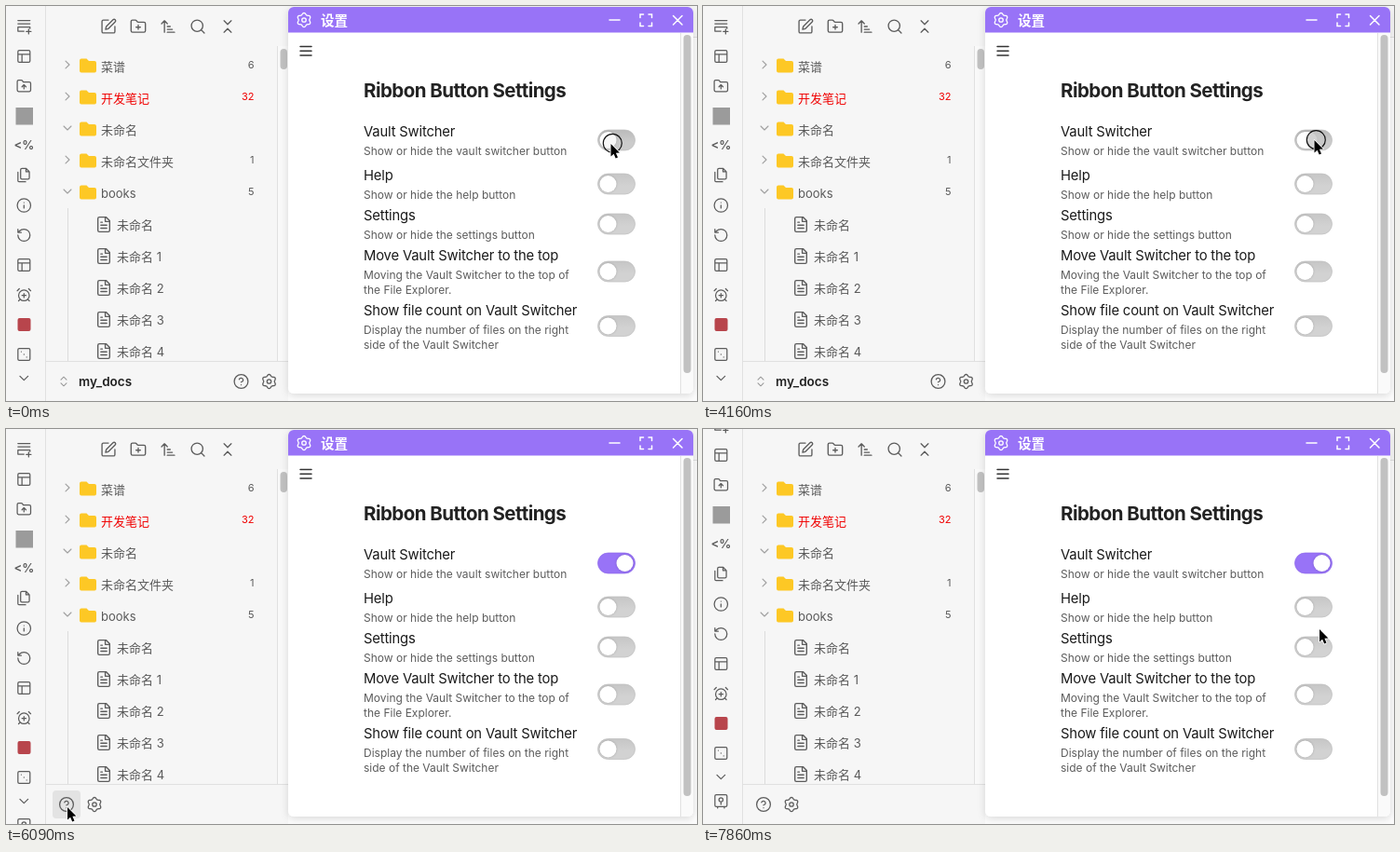
An HTML page for the animation above (8 s loop, 742 by 424 pixels).

```html
<!DOCTYPE html>
<html lang="en">
<head>
<meta charset="utf-8">
<title>Settings demo</title>
<style>
  html, body { margin: 0; width: 100%; height: 100%; overflow: hidden; background: #f6f6f6; }
  svg { display: block; }
  text { font-family: Inter, "Noto Sans CJK SC", "Noto Sans CJK", sans-serif; fill: #5a5a5a; font-size: 13px; }
  .icon { fill: none; stroke: #5c5c5c; stroke-width: 1.75; stroke-linecap: round; stroke-linejoin: round; }
  .count { font-size: 11px; text-anchor: end; }
  .red { fill: #f00000; }
  .name { font-size: 14.8px; letter-spacing: -.17px; fill: #1a1a1a; }
  .desc { font-size: 12px; fill: #5c5c5c; }
  .heading { font-size: 20.5px; font-weight: 700; letter-spacing: -.027em; fill: #222; }
  .line { stroke: #e0e0e0; }
  .knob { fill: #fff; filter: drop-shadow(0 .5px .8px rgba(0, 0, 0, .2)); }
</style>
</head>
<body>
<svg width="742" height="424" viewBox="0 0 742 424">
  <defs>
    <clipPath id="treeClip"><rect x="43" y="43" width="260" height="338"/></clipPath>
    <filter id="shadow" x="-10%" y="-10%" width="120%" height="120%">
      <feDropShadow dx="0" dy="2" stdDeviation="4" flood-opacity=".14"/>
    </filter>
    <linearGradient id="off" x2="0" y2="1">
      <stop stop-color="#c6c6c6"/><stop offset=".6" stop-color="#d2d2d2"/>
    </linearGradient>
    <linearGradient id="over" x2="0" y2="1">
      <stop stop-color="#bababa"/><stop offset=".6" stop-color="#cbcbcb"/>
    </linearGradient>
  </defs>

  <rect width="742" height="424" fill="#f6f6f6"/>
  <rect x="303" y="33" width="439" height="391" fill="#fcfcfc"/>
  <path class="line" d="M303 33.5H742M42.5 0V424"/>

  <rect id="hover" rx="4" fill="#e3e3e3"/>
  <g id="ribbon"></g>
  <g id="toolbar"></g>
  <g id="tree" clip-path="url(#treeClip)">
    <path d="M66.5 217V381" stroke="#dcdcdc"/>
  </g>
  <rect x="291" y="43" width="12" height="338" fill="#f9f9f9"/>
  <path class="line" d="M291.5 43V381M43 381.5H303"/>
  <rect x="294.5" y="46" width="7.5" height="22" rx="3.75" fill="#c1c1c1"/>
  <g id="switcher">
    <text x="78" y="407.5" style="font-weight:600;font-size:13.5px;fill:#222">my_docs</text>
  </g>
  <g id="footer"></g>

  <g id="modal">
    <rect x="303" y="1" width="435" height="415" rx="6" fill="#fff" filter="url(#shadow)"/>
    <path d="M303 28.5V7a6 6 0 0 1 6-6H732a6 6 0 0 1 6 6V28.5z" fill="#9873f7"/>
    <text x="338" y="20.5" style="font-size:14.5px;font-weight:700;fill:#fff">设置</text>
    <g fill="none" stroke="#fff" stroke-width="1.5" stroke-linecap="round">
      <path d="M648 15H659M716.5 10.5l9.5 9.5M726 10.5l-9.5 9.5"/>
      <path d="M681 12.5V9h3.5M690 9h3.5v3.5M693.5 18v3.5H690M684.5 21.5H681V18"/>
    </g>
    <path d="M316 43.5h12M316 48.3h12M316 53h12" stroke="#333" stroke-width="1.5" stroke-linecap="round"/>
    <path d="M724.5 29H738V410a6 6 0 0 1-6 6H724.5z" fill="#fafafa"/>
    <path class="line" d="M724.5 29V416"/>
    <rect x="727.5" y="31" width="8" height="363" rx="4" fill="#c1c1c1"/>
    <text class="heading" x="384" y="98">Ribbon Button Settings</text>
  </g>

  <circle id="ring" r="10" fill="#c8c8c8" stroke="#111" stroke-width="1.2"/>
  <path id="cursor" d="M0 0V13.5L3.1 10.7 5.2 15.6 7.5 14.6 5.4 9.8 9.4 9.5z"
        fill="#000" stroke="#fff" stroke-width="1.6" paint-order="stroke" stroke-linejoin="round"/>
</svg>

<script>
const LOOP = 8000;
const $ = id => document.getElementById(id);

function set(el, attrs) {
  for (const key in attrs) el.setAttribute(key, attrs[key]);
}

function add(parent, tag, attrs, content) {
  const el = document.createElementNS('http://www.w3.org/2000/svg', tag);
  set(el, attrs);
  if (content) el.textContent = content;
  return parent.appendChild(el);
}

// Icons are drawn on a 24-unit grid and centred on x, y.
const icon = (parent, x, y, d, scale = .72, attrs = {}) =>
  add(parent, 'path', { class: 'icon', d, transform: `translate(${x} ${y}) scale(${scale}) translate(-12 -12)`, ...attrs });

const circle = (x, y, r) => `M${x + r} ${y}a${r} ${r} 0 1 1 ${-2 * r} 0 ${r} ${r} 0 0 1 ${2 * r} 0z`;
const lobes = Array.from({ length: 72 }, (_, i) => {
  const a = i * Math.PI / 36, r = 9 - 1.2 * Math.cos(6 * a);
  return (12 + r * Math.cos(a)).toFixed(2) + ' ' + (12 + r * Math.sin(a)).toFixed(2);
}).join('L');
const box = 'M5 3h14a2 2 0 0 1 2 2v14a2 2 0 0 1-2 2H5a2 2 0 0 1-2-2V5a2 2 0 0 1 2-2z';
const folder = 'M4 20h16a2 2 0 0 0 2-2V8a2 2 0 0 0-2-2h-7.9a2 2 0 0 1-1.7-.9l-.8-1.2A2 2 0 0 0 7.9 3H4a2 2 0 0 0-2 2v13a2 2 0 0 0 2 2z';
const ICON = {
  rows: 'M3 3h18M3 8h18M3 13h18v2M3 13v6h9M19 16v7M15.5 19.5h7',
  layout: box + 'M3 9h18M9 21V9',
  folderUp: folder + 'M12 10v6M9 13l3-3 3 3',
  folderPlus: folder + 'M12 10v6M9 13h6',
  files: 'M15 2H9a2 2 0 0 0-2 2v12a2 2 0 0 0 2 2h9a2 2 0 0 0 2-2V7zM15 2v5h5M3 7.6v12.8A1.6 1.6 0 0 0 4.6 22h9.8',
  info: circle(12, 12, 10) + 'M12 16v-4M12 8h.01',
  undo: 'M3 12a9 9 0 1 0 9-9 9.75 9.75 0 0 0-6.74 2.74L3 8M3 3v5h5',
  alarm: circle(12, 13, 8) + 'M5 3 2 6M22 6l-3-3M6.4 18.7 4 21M17.6 18.7 20 21M12 10v6M9 13h6',
  dice: box + 'M8 8h.01M12 12h.01M16 16h.01',
  down: 'M6 9l6 6 6-6',
  right: 'M9 6l6 6-6 6',
  vault: box + circle(12, 10.5, 3) + 'M12 13.5v4M7 21v2M17 21v2',
  edit: 'M12 3H5a2 2 0 0 0-2 2v14a2 2 0 0 0 2 2h14a2 2 0 0 0 2-2v-7M18.4 2.6a2.1 2.1 0 0 1 3 3L12 15l-4 1 1-4z',
  sort: 'M3 8l4-4 4 4M7 4v16M11 12h4M11 16h7M11 20h10',
  search: circle(11, 11, 8) + 'M21 21l-4.3-4.3',
  collapse: 'M7 20l5-5 5 5M7 4l5 5 5-5',
  upDown: 'M7 15l5 5 5-5M7 9l5-5 5 5',
  help: circle(12, 12, 10) + 'M9.1 9a3 3 0 0 1 5.8 1c0 2-3 3-3 3M12 17h.01',
  gear: `M${lobes}z` + circle(12, 12, 3),
  page: 'M15 2H6a2 2 0 0 0-2 2v16a2 2 0 0 0 2 2h12a2 2 0 0 0 2-2V7zM14 2v6h6M16 13H8M16 17H8M10 9H8'
};

// Ribbon
const ribbon = $('ribbon');
[['rows', 22], ['layout', 54], ['folderUp', 86], ['files', 181.5], ['info', 214], ['undo', 246],
 ['layout', 278], ['alarm', 310], ['dice', 374], ['down', 399.5]]
  .forEach(([name, y]) => icon(ribbon, 19.3, y, ICON[name]));
add(ribbon, 'rect', { x: 10.5, y: 109, width: 18.5, height: 18.5, fill: '#9b9b9b' });
add(ribbon, 'text', { x: 19.3, y: 154, 'text-anchor': 'middle', style: 'font-size:13px;font-weight:600' }, '<%');
add(ribbon, 'rect', { x: 12.5, y: 335, width: 14, height: 14, rx: 2, fill: '#b8454c' });
const vaultIcon = icon(ribbon, 19.3, 425, ICON.vault);

['edit', 'folderPlus', 'sort', 'search', 'collapse']
  .forEach((name, i) => icon($('toolbar'), 110 + 32 * i, 22, ICON[name], .77));

// File tree
const tree = $('tree');
[['菜谱', 6], ['开发笔记', 32], ['未命名', '', true], ['未命名文件夹', 1], ['books', 5, true]].forEach(([label, count, open], i) => {
  const y = 65 + 34 * i, red = i === 1 ? ' red' : '';
  icon(tree, 66, y - 2, open ? ICON.down : ICON.right, .66, { style: 'stroke:#a0a0a0' });
  add(tree, 'path', { fill: '#fdc825', d: `M81 ${y - 8.5}h5.5l2.5 2.5h6a2 2 0 0 1 2 2v8.5a2 2 0 0 1-2 2H81a2 2 0 0 1-2-2v-11a2 2 0 0 1 2-2z` });
  add(tree, 'text', { x: 102, y: y + 5.2, class: red }, label);
  add(tree, 'text', { x: 266.5, y: y + 2.2, class: 'count' + red }, String(count));
});
const fileLabels = Array.from({ length: 5 }, (_, i) => {
  const y = 235 + 34 * i;
  icon(tree, 105, y - .5, ICON.page, .79);
  return add(tree, 'text', { x: 119, y: y + 5.2 }, '未命名' + (i ? ' ' + i : ''));
});

// Footer
icon($('switcher'), 62, 403, ICON.upDown, .6, { style: 'stroke:#999' });
const footer = $('footer');
icon(footer, 252.5, 403, ICON.help, .74);
icon(footer, 282.5, 403, ICON.gear, .74);

// Settings window
const modal = $('modal');
icon(modal, 320, 15, ICON.gear, .74, { style: 'stroke:#fff' });
const toggles = [
  [140, 144, 'Vault Switcher', 'Show or hide the vault switcher button'],
  [187, 191, 'Help', 'Show or hide the help button'],
  [230, 234, 'Settings', 'Show or hide the settings button'],
  [273, 285, 'Move Vault Switcher to the top', 'Moving the Vault Switcher to the top of', 'the File Explorer.'],
  [331.5, 343.5, 'Show file count on Vault Switcher', 'Display the number of files on the right', 'side of the Vault Switcher']
].map(([top, y, name, ...lines]) => {
  add(modal, 'text', { x: 384, y: top, class: 'name' }, name);
  lines.forEach((line, i) => add(modal, 'text', { x: 384, y: top + 20.3 + 15.7 * i, class: 'desc' }, line));
  const track = add(modal, 'rect', { x: 635.5, y: y - 11, width: 40, height: 22, rx: 11, 'stroke-width': .7 });
  const knob = add(modal, 'rect', { class: 'knob', y: y - 9, height: 18, rx: 9 });
  return { y, track, knob };
});

// Pointer positions: time, x, y
const pointer = [
  [0, 649.5, 148], [750, 649.5, 147], [1040, 649.5, 145], [1340, 649.5, 144.3], [1630, 649.3, 144],
  [1780, 658, 124], [1930, 677, 96], [2070, 691, 83], [2220, 694, 104], [2370, 689, 148],
  [2520, 678.5, 179], [2670, 669, 166], [2820, 651, 156], [2970, 643, 147], [3120, 656.5, 146],
  [3710, 656.5, 144], [5050, 650, 150], [5200, 600, 185], [5340, 500, 240], [5490, 350, 310],
  [5640, 205, 355], [5790, 119, 370], [5940, 85, 392], [6090, 66, 406], [6230, 40, 413],
  [6380, 34, 412], [6530, 30, 409], [6680, 27, 406], [6830, 25, 404], [6980, 24, 403],
  [7130, 22, 402], [7280, 110, 392], [7430, 330, 320], [7580, 560, 255], [7720, 677, 222], [7860, 662, 215]
];
// Hover areas: x, y, width, height
const areas = [[54, 353, 224, 28], [50, 388, 30, 30], [80, 388, 30, 30], [5, 384, 28, 30]];
const inside = (px, py, [x, y, w, h]) => px >= x && px < x + w && py >= y && py < y + h;

function render(t) {
  const [, x, y] = pointer.findLast(p => p[0] <= t);
  set($('cursor'), { transform: `translate(${x} ${y})` });

  const pressed = t >= 4160 && t < 4310;
  const [cx, cy] = pressed ? [658.3, 143.7] : [651.3, 147.3];
  set($('ring'), { cx, cy, 'fill-opacity': pressed ? .8 : .15, visibility: pressed || t < 150 ? 'visible' : 'hidden' });

  const on = t >= 4310;
  toggles.forEach((toggle, i) => {
    const active = on && i === 0;
    const over = inside(x, y, [635, toggle.y - 11, 41, 22]);
    set(toggle.track, {
      fill: active ? '#9873f7' : over ? 'url(#over)' : 'url(#off)',
      stroke: active ? '#8d68ea' : '#bdbdbd'
    });
    set(toggle.knob, {
      x: !active ? 637.5 : t < 4450 ? 650 : 655.5,
      width: i === 0 && pressed ? 22 : 18
    });
  });

  set($('switcher'), { visibility: on ? 'hidden' : 'visible' });
  set(footer, { transform: `translate(${on ? -187.5 : 0} 0)` });
  set(vaultIcon, { visibility: on ? 'visible' : 'hidden' });
  const scroll = t < 6230 ? 0 : t < 6380 ? 13 : 26;
  set(ribbon, { transform: `translate(0 ${-scroll})` });

  const area = areas.find(a => inside(x, y, a));
  const [ax, ay, width, height] = area || [0, 0, 0, 0];
  set($('hover'), { x: ax, y: ay, width, height });
  fileLabels[4].style.fill = area === areas[0] ? '#222' : '';
}

const start = performance.now();
function tick() {
  render((performance.now() - start) % LOOP);
  requestAnimationFrame(tick);
}
tick();
</script>
</body>
</html>
```
